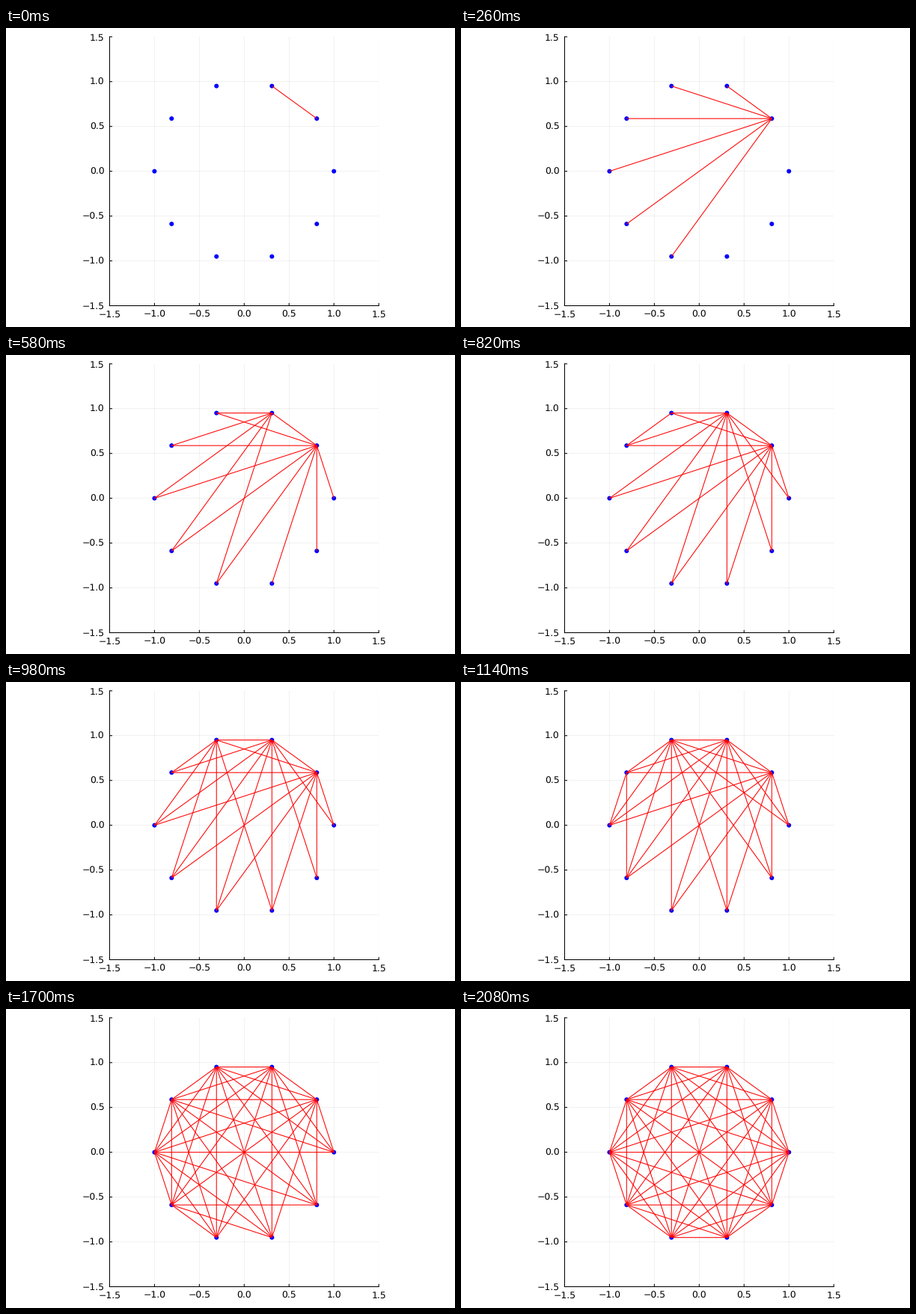
Recreate the animation shown at these times as a matplotlib script. Size 600 by 400 pixels, loop 2.18 s.

```python
from itertools import combinations

import matplotlib.pyplot as plt
import numpy as np
from matplotlib.animation import FuncAnimation
from matplotlib.collections import LineCollection
from matplotlib.patches import Circle

W, H, DPI = 600, 400, 100
LEFT, TOP, SIDE = 138.45, 11.8, 359.7
PX = 72 / DPI  # points per pixel
LIM = 1.5
UNIT = 2 * LIM / SIDE  # data units per pixel
N = 10
TICK_MS = 20

# Keep fractional positions instead of rounding lines to whole pixels.
plt.rcParams.update({"path.snap": False, "text.hinting": "none"})

angles = 2 * np.pi * np.arange(1, N + 1) / N
points = np.column_stack([np.cos(angles), np.sin(angles)])
edges = [points[list(pair)] for pair in combinations(range(N), 2)]

# Every third edge, and the finished graph, stays on screen five ticks.
steps = np.arange(len(edges))
holds = np.where((steps % 3 == 1) | (steps == steps[-1]), 5, 1)
timeline = np.repeat(steps, holds)

fig = plt.figure(figsize=(W / DPI, H / DPI), dpi=DPI, facecolor="white")
ax = fig.add_axes([LEFT / W, 1 - (TOP + SIDE) / H, SIDE / W, SIDE / H])
ax.set(xlim=(-LIM, LIM), ylim=(-LIM, LIM))

ticks = np.linspace(-LIM, LIM, 7)
labels = [f"{t:.1f}".replace("-", "\u2212") for t in ticks]
ax.set_xticks(ticks, labels)
ax.set_yticks(ticks, labels)
ax.tick_params(length=0, labelsize=12.4 * PX, labelfontfamily="DejaVu Sans")
ax.tick_params(axis="x", pad=6.2 * PX)
ax.tick_params(axis="y", pad=6.8 * PX)
ax.grid(color="black", alpha=0.1, linewidth=0.55 * PX)
ax.set_axisbelow(True)
ax.spines[["top", "right"]].set_visible(False)
ax.spines[["left", "bottom"]].set_linewidth(1.05 * PX)

tick_end = -LIM + 3.6 * UNIT
tick_style = dict(colors="black", linewidths=1.05 * PX, clip_on=False)
ax.vlines(ticks, -LIM, tick_end, **tick_style)
ax.hlines(ticks, -LIM, tick_end, **tick_style)

for point in points:
    ax.add_patch(Circle(point, 3 * UNIT, color="blue", linewidth=0, zorder=3))
lines = LineCollection([], colors="red", linewidths=1.05 * PX, zorder=4)
ax.add_collection(lines, autolim=False)
ax.set(xlim=(-LIM, LIM), ylim=(-LIM, LIM))


def update(frame):
    lines.set_segments(edges[:timeline[frame] + 1])
    return [lines]


anim = FuncAnimation(fig, update, frames=len(timeline), interval=TICK_MS,
                     repeat=True, repeat_delay=0)
plt.show()
```
